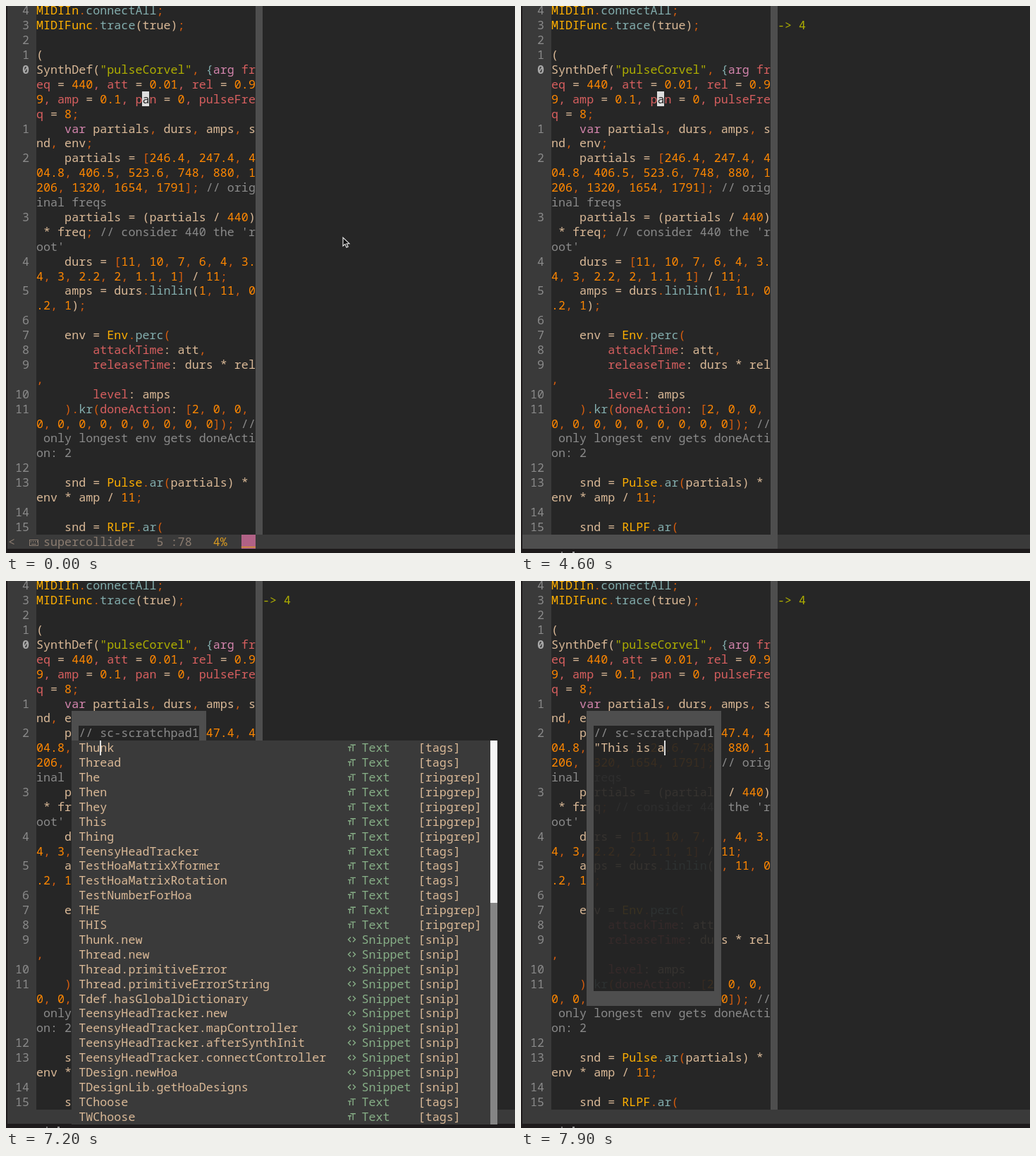
These frames come from a looping animation (722x775 px, 8 s). An HTML page with a canvas:

```html
<!DOCTYPE html>
<html>
<head>
<meta charset="utf-8">
<style>
html, body { margin: 0; width: 100%; height: 100%; overflow: hidden; background: #1e1b1c; }
canvas { display: block; }
</style>
</head>
<body>
<canvas id="stage" width="722" height="775"></canvas>
<script>
const ctx = document.getElementById('stage').getContext('2d');
const LOOP = 8000, CELL = 10.03, LINE = 20.9, LEFT = 43, TOP = -4.1, WRAP = 31;
const FACE = '"Noto Sans Mono", "DejaVu Sans Mono", monospace';
const C = {
  bg: '#262626', bar: '#3a3a3a', split: '#4e4e4e', fg: '#dab997', gray: '#8a8a8a',
  red: '#d75f5f', green: '#afaf00', yellow: '#ffaf00', blue: '#83adad', purple: '#d485ad',
  aqua: '#87af87', orange: '#ff8700', rust: '#d65d0e', dim: '#8b7c70', cursor: '#dedede'
};

const CODE = `MIDIIn.connectAll;
MIDIFunc.trace(true);

(
SynthDef("pulseCorvel", {arg freq = 440, att = 0.01, rel = 0.99, amp = 0.1, pan = 0, pulseFreq = 8;
    var partials, durs, amps, snd, env;
    partials = [246.4, 247.4, 404.8, 406.5, 523.6, 748, 880, 1206, 1320, 1654, 1791]; // orig\
inal freqs
    partials = (partials / 440) * freq; // consider 440 the 'root'
    durs = [11, 10, 7, 6, 4, 3.4, 3, 2.2, 2, 1.1, 1] / 11;
    amps = durs.linlin(1, 11, 0.2, 1);

    env = Env.perc(
        attackTime: att,
        releaseTime: durs * rel,
        level: amps
    ).kr(doneAction: [2, 0, 0, 0, 0, 0, 0, 0, 0, 0, 0, 0]); // only longest env gets doneAction: 2

    snd = Pulse.ar(partials) * env * amp / 11;

    snd = RLPF.ar(`.split('\n');
const CURRENT = 4;

const RULES = [
  [/\/\/.*/y, 'gray'], [/"[^"]*"/y, 'green'], [/\d+(\.\d+)?/y, 'orange'],
  [/\b(var|arg)\b/y, 'purple'], [/SynthDef/y, 'fg'], [/\b[A-Z]\w+/y, 'yellow'],
  [/\w+(?=:)/y, 'red'], [/(?<=\.)\w+/y, 'blue'], [/\w+/y, 'fg'],
  [/\{/y, 'blue'], [/[.,;[\]()]/y, 'rust']
];

// One colour name per character.
function paint(line) {
  const colors = [];
  const args = line.indexOf('{arg') + 1;
  for (let i = 0; i < line.length;) {
    let len = 1, color = 'fg';
    for (const [rule, name] of RULES) {
      rule.lastIndex = i;
      const hit = rule.exec(line);
      if (hit) { len = hit[0].length; color = name; break; }
    }
    if (args && i > args && (color === 'fg' && /\w/.test(line[i]) || line[i] === ',')) color = 'red';
    if ('()'.includes(line[i]) && !/(perc|kr|ar)\($|^ +\)/.test(line.slice(0, i + 1))) color = 'fg';
    while (len--) { colors.push(color); i++; }
  }
  return colors;
}

const rows = [];
CODE.forEach((line, n) => {
  const colors = paint(line);
  for (let i = 0; i === 0 || i < line.length; i += WRAP) {
    rows.push({
      text: line.slice(i, i + WRAP), colors: colors.slice(i, i + WRAP),
      number: i ? '' : String(Math.abs(n - CURRENT)), current: n === CURRENT
    });
  }
});

// kind, completion: t = tags, r = ripgrep, s = snippet
const MENU = `t Thunk,t Thread,r The,r Then,r They,r This,r Thing,t TeensyHeadTracker,
t TestHoaMatrixXformer,t TestHoaMatrixRotation,t TestNumberForHoa,r THE,r THIS,s Thunk.new,
s Thread.new,s Thread.primitiveError,s Thread.primitiveErrorString,s Tdef.hasGlobalDictionary,
s TeensyHeadTracker.new,s TeensyHeadTracker.mapController,s TeensyHeadTracker.afterSynthInit,
s TeensyHeadTracker.connectController,s TDesign.newHoa,s TDesignLib.getHoaDesigns,
t TChoose,t TWChoose`.split(',').map(s => s.trim());
const TAGS = { t: '[tags]', r: '[ripgrep]', s: '[snip]' };

// start, typed text, cursor shape, cursor column
const PAD = [
  [800, '', 'block', 6], [1400, '', '', 6], [1900, '', 'block', 6], [2200, '', 'bar', 6],
  [3500, '2+2', 'block', 8], [6100, '', 'block', 6], [6500, '', 'bar', 6], [6800, '"', 'bar', 7],
  [7100, '"T', 'bar', 8], [7200, '"Th', 'bar', 9], [7300, '"This', 'bar', 11],
  [7500, '"This ', 'bar', 12], [7600, '"This i', 'bar', 13], [7700, '"This is ', 'bar', 15],
  [7900, '"This is a', 'bar', 16]
];
const MOUSE = [[0, 478, 328], [200, 575, 475], [300, 673, 623]];

const x = col => LEFT + col * CELL;
const y = row => TOP + row * LINE;
const at = (list, t) => list.filter(e => e[0] <= t).pop();

function box(x0, y0, x1, y1, color) {
  x0 = Math.round(x0); y0 = Math.round(y0);
  ctx.fillStyle = color;
  ctx.fillRect(x0, y0, Math.round(x1) - x0, Math.round(y1) - y0);
}

function put(text, row, col, color, weight = 400) {
  ctx.font = `${weight} 16.7px ${FACE}`;
  [...text].forEach((ch, i) => {
    ctx.fillStyle = Array.isArray(color) ? C[color[i]] : color;
    ctx.fillText(ch, x(col + i), y(row) + 16.4);
  });
}

function cursor(shape, row, col, ch = '') {
  if (!shape) return;
  box(x(col), y(row), shape === 'bar' ? x(col) + 2 : x(col + 1), y(row + 1), C.cursor);
  if (shape === 'block') put(ch, row, col, C.bg);
}

function editor() {
  box(0, 0, 722, 775, '#1e1b1c');
  box(2, 0, 722, 749, C.bg);
  box(2, 0, 43, 749, C.bar);
  box(354, 0, 364, 749, C.split);
  box(2, 749, 722, 769, C.bar);
  rows.forEach((r, i) => {
    put(r.number, i, -1 - r.number.length, r.current ? '#a8a8a8' : C.gray, r.current ? 700 : 400);
    put(r.text, i, 0, r.colors);
  });
}

function status() {
  put('<', 36, -4, C.dim);
  put('supercollider', 36, 1, C.dim);
  put('5 :78', 36, 17, C.dim);
  put('4%', 36, 25, '#d79921');
  box(334, 749, 354, 769, '#b16286');
  put('__', 36, 29, '#d79921');
  ctx.strokeStyle = C.dim;
  ctx.strokeRect(33.5, 756.5, 12, 8);
  for (let i = 0; i < 4; i++) {
    box(35 + i * 3, 758, 36 + i * 3, 760, C.dim);
  }
  box(36, 762, 43, 763, C.dim);
}

function mouse(t) {
  const [, px, py] = at(MOUSE, t);
  const arrow = new Path2D('M0 0V12L3 9.4L5 14L7.2 13L5.2 8.7H9Z');
  ctx.save();
  ctx.translate(px, py);
  ctx.fillStyle = '#111';
  ctx.strokeStyle = '#eee';
  ctx.lineWidth = 1.1;
  ctx.fill(arrow);
  ctx.stroke(arrow);
  ctx.restore();
}

function popup(t) {
  const [, text, shape, col] = at(PAD, t);
  ctx.fillStyle = 'rgba(36,36,36,.9)';
  ctx.fillRect(103, 205, 171, 376);
  box(93, 184, 284, 205, C.split);
  box(93, 581, 284, 602, C.split);
  box(93, 205, 103, 581, C.split);
  box(274, 205, 284, 581, C.split);
  box(103, 205, 274, 226, '#242424');
  put('// sc-scratchpad1', 10, 6, C.gray);
  [...text].forEach((ch, i) => {
    if (ch === ' ') return;
    box(x(6 + i), y(11), x(7 + i), y(12), '#242424');
    put(ch, 11, 6 + i, /\d/.test(ch) ? C.orange : C.fg);
  });
  if (t >= 7200 && t < 7500) menu();
  cursor(shape, 11, col, text[col - 6]);
}

function menu() {
  box(93, 226, 697, 770, C.bar);
  MENU.forEach((item, i) => {
    const row = 11 + i, kind = item[0], snip = kind === 's';
    put(item.slice(2), row, 6, C.fg);
    put(snip ? 'Snippet' : 'Text', row, 46, C.aqua);
    put(TAGS[kind], row, 54, C.fg);
    icon(snip, y(row) + 10.5);
  });
  box(687, 226, 697, 456, '#f7f7f7');
  box(687, 456, 697, 770, '#858585');
}

function icon(snip, cy) {
  ctx.strokeStyle = C.aqua;
  ctx.lineWidth = 1.4;
  ctx.stroke(new Path2D(snip
    ? `M489 ${cy - 3.5}L485.5 ${cy}L489 ${cy + 3.5}M492 ${cy - 3.5}L495.5 ${cy}L492 ${cy + 3.5}`
    : `M488.5 ${cy - 4}H496M492.2 ${cy - 4}V${cy + 5}M485 ${cy - 1}H490M487.5 ${cy - 1}V${cy + 5}`));
  ctx.lineWidth = 1;
}

function draw(t) {
  const open = t >= 800 && t < 4600 || t >= 6100;
  editor();
  if (t < 800) status();
  else {
    box(57, 773, 59, 775, '#777');
    box(73, 773, 76, 775, '#999');
    if (t < 4000) box(697, 773, 703, 775, '#999');
  }
  if (t >= 4600) put('-> 4', 1, 32, C.green);
  if (open) popup(t);
  else {
    if (t >= 4600) box(2, 749, 364, 769, C.split);
    if (t < 5200 || t >= 5700) cursor('block', 6, 15, 'a');
  }
  if (t < 600) mouse(t);
}

const start = performance.now();
function tick() {
  draw((performance.now() - start) % LOOP);
  requestAnimationFrame(tick);
}
tick();
</script>
</body>
</html>
```
